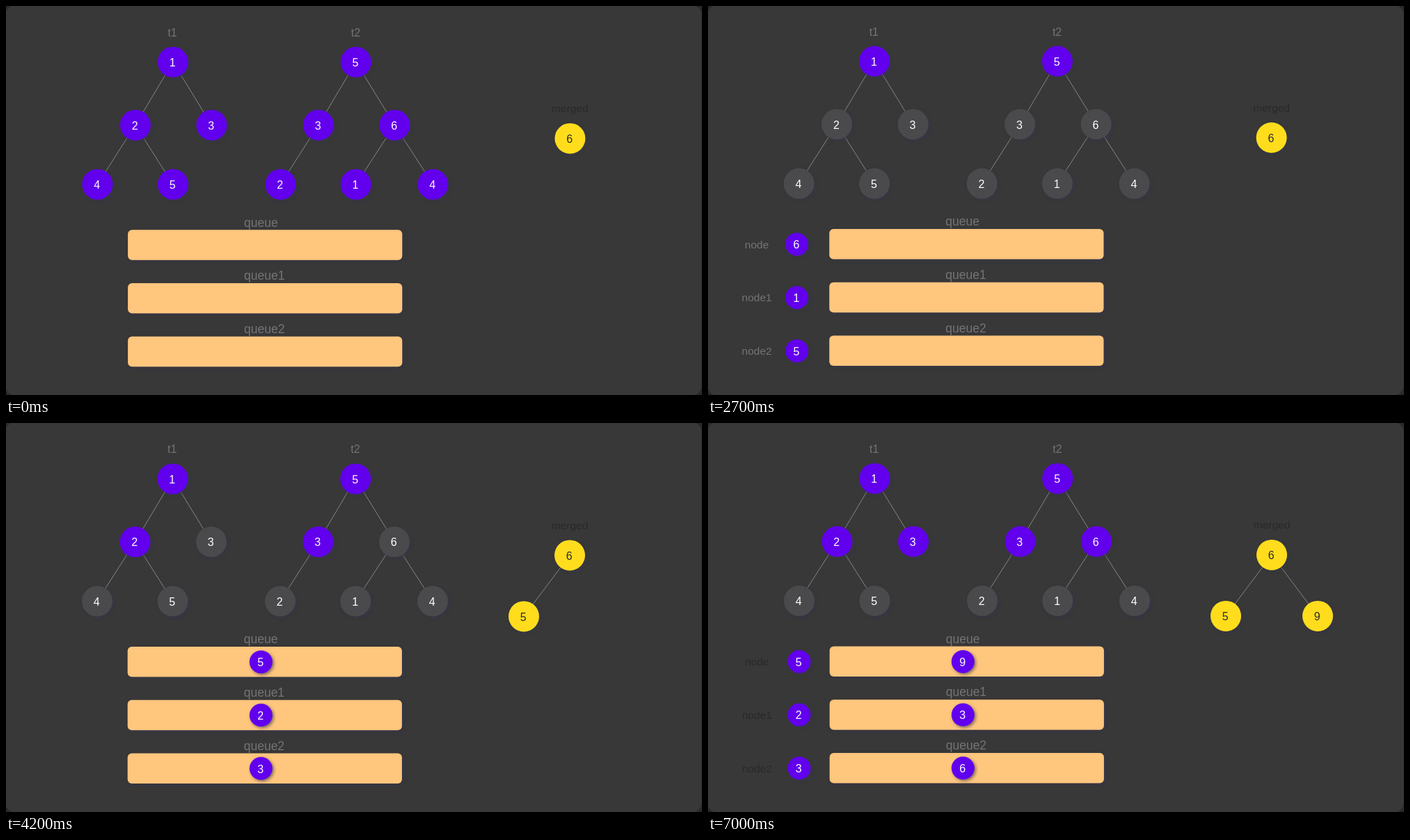
These frames come from a looping animation (1000 px wide and 560 px high, 8 s). An HTML page with a canvas:

```html
<!DOCTYPE html>
<html lang="en">
<head>
<meta charset="utf-8">
<title>Merging two binary trees</title>
<style>
  html, body { margin: 0; width: 100%; height: 100%; overflow: hidden; background: #383838; }
  canvas { display: block; width: 1000px; height: 560px; }
</style>
</head>
<body>
<canvas id="stage" width="1000" height="560"></canvas>
<script>
const ctx = document.getElementById('stage').getContext('2d');
const LOOP = 8000;
const FONT = '"Liberation Sans", Arial, sans-serif';
const PURPLE = '#6200ee', YELLOW = '#ffdd1c', IDLE = '#4a4a4c';
const LABEL = '#747477', DARK = '#29292c';

// Nodes: [value, x, y, parent index]
const t1 = [[1, 239.5, 80], [2, 185.5, 170.7, 0], [3, 295, 170.7, 0],
            [4, 131, 256.1, 1], [5, 239.5, 256.1, 1]];
const t2 = [[5, 502.3, 80], [3, 448.5, 170.7, 0], [6, 558, 170.7, 0],
            [2, 394, 256.1, 1], [1, 502.3, 256.1, 2], [4, 613, 256.1, 2]];
const merged = [[6, 810, 190], [5, 744, 278, 0], [9, 876, 278, 0]];

// lit: visited nodes per tree, size: nodes in the merged tree,
// queues: contents of each bar, out: values taken from the queues
const steps = [
  { at: 0, dx: .4, dy: .7, lit: 6, size: 1, queues: [[], [], []] },
  { at: 1100, dx: 0, dy: .3, lit: 6, size: 1, queues: [[6], [1], [5]] },
  { at: 2700, dx: -.4, dy: -.5, lit: 1, size: 1, queues: [[], [], []],
    out: [6, 1, 5], outX: 128, outColor: LABEL },
  { at: 4200, dx: 0, dy: .4, lit: 2, size: 2, queues: [[5], [2], [3]] },
  { at: 5500, dx: -.1, dy: -.2, lit: 3, size: 3, queues: [[5, 9], [2, 3], [3, 6]] },
  { at: 7000, dx: 0, dy: -.1, lit: 3, size: 3, queues: [[9], [3], [6]],
    out: [5, 2, 3], outX: 131, outColor: DARK }
];

function text(str, x, y, size, color, align = 'center') {
  ctx.font = `${size}px ${FONT}`;
  ctx.textAlign = align;
  ctx.fillStyle = color;
  ctx.fillText(str, x, y);
}

function shadowed(color, trace) {
  ctx.save();
  ctx.shadowColor = 'rgba(52, 52, 80, .65)';
  ctx.shadowBlur = 4;
  ctx.shadowOffsetX = ctx.shadowOffsetY = 2;
  ctx.fillStyle = color;
  ctx.beginPath();
  trace();
  ctx.fill();
  ctx.restore();
}

function disc(value, x, y, r, color, ink = '#fff') {
  shadowed(color, () => ctx.arc(x, y, r, 0, Math.PI * 2));
  text(value, x - .7, y + 6.3, 16, ink);
}

function tree(nodes, colorOf, ink) {
  ctx.strokeStyle = '#858587';
  ctx.lineWidth = 1;
  ctx.beginPath();
  for (const [, x, y, parent] of nodes) {
    if (parent === undefined) continue;
    ctx.moveTo(nodes[parent][1], nodes[parent][2]);
    ctx.lineTo(x, y);
  }
  ctx.stroke();
  nodes.forEach(([value, x, y], i) => disc(value, x, y, 22, colorOf(i), ink));
}

function queueRow(step, i) {
  const y = 321.6 + i * 76.7, mid = y + 21.9, suffix = i || '';
  text('queue' + suffix, 341.7, y - 4.8, 17.5, LABEL, 'left');
  shadowed('#ffc67d', () => ctx.roundRect(174.7, y, 394.2, 43.5, 6));
  const items = step.queues[i];
  items.forEach((value, k) =>
    disc(value, 366.3 + (k - (items.length - 1) / 2) * 57.7, mid, 16.5, PURPLE));
  if (step.out) {
    text('node' + suffix, 70.5, mid + 5.7, 15.5, step.outColor);
    disc(step.out[i], step.outX, mid, 16.5, PURPLE);
  }
}

function draw(time) {
  const step = steps.findLast(s => time >= s.at);
  ctx.fillStyle = '#292929';
  ctx.fillRect(0, 0, 1000, 560);
  ctx.fillStyle = '#383838';
  ctx.beginPath();
  ctx.roundRect(-1, -1, 1000.5, 561.5, 14);
  ctx.fill();

  ctx.save();
  ctx.translate(step.dx, step.dy);
  text('t1', 238.7, 43, 16, LABEL);
  text('t2', 502, 43, 16, LABEL);
  text('merged', 810, 152.3, 15.5, DARK);
  const visited = i => i < step.lit ? PURPLE : IDLE;
  tree(t1, visited);
  tree(t2, visited);
  tree(merged.slice(0, step.size), () => YELLOW, '#2b2b2b');
  for (let i = 0; i < 3; i++) queueRow(step, i);
  ctx.restore();
}

const start = performance.now();
function tick() {
  draw((performance.now() - start) % LOOP);
  requestAnimationFrame(tick);
}
tick();
</script>
</body>
</html>
```
